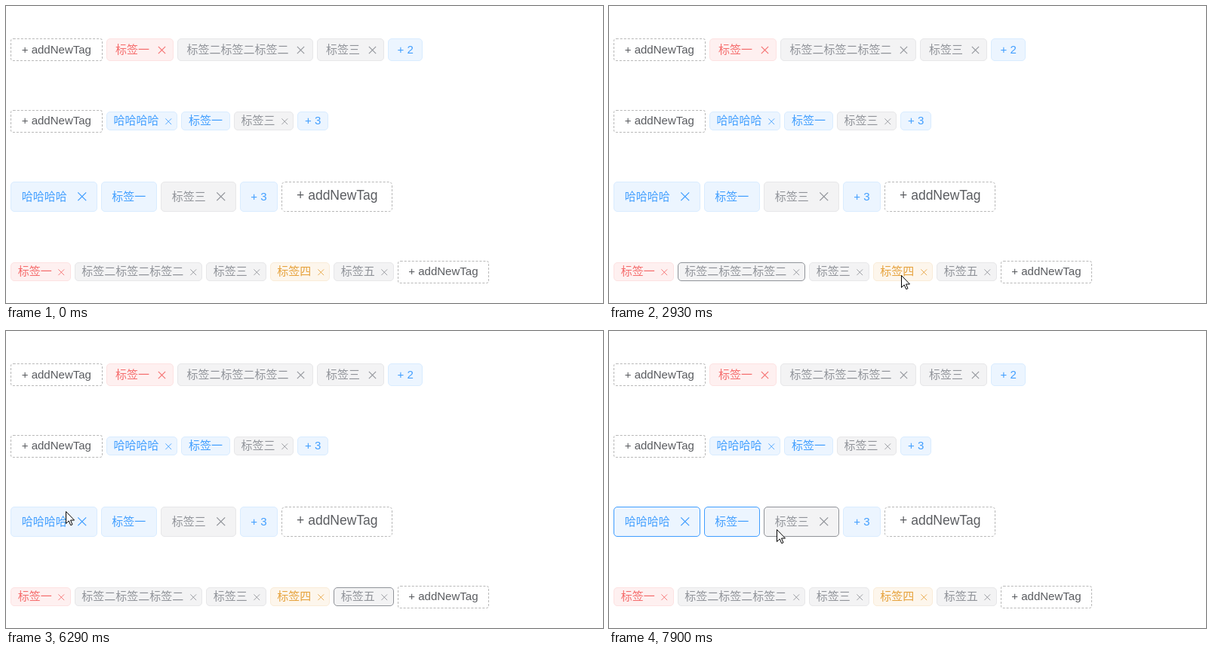
Write an HTML page that moves like this. It is 791 px wide and 394 px high and loops after 8 s.

```html
<!DOCTYPE html>
<html lang="zh-CN">
<head>
<meta charset="utf-8">
<title>Tag selection</title>
<style>
  html, body { margin: 0; width: 100%; height: 100%; overflow: hidden; background: #fff; }
  #stage { position: relative; width: 791px; height: 394px; overflow: hidden; }
  #rows {
    zoom: 1.25;
    font: 12px/1 "Liberation Sans", "Noto Sans CJK SC", "Noto Sans CJK JP", "Noto Sans CJK", sans-serif;
  }
  .row {
    position: absolute; left: 4.8px; height: 0; white-space: pre;
    display: flex; align-items: center; gap: 4px;
    --tag: 24px; --pad: 9px; --icon: 14px; --space: 6px;
  }
  .small { --tag: 20px; --pad: 7px; --icon: 12px; --space: 4px; }
  .large { --tag: 32px; --pad: 11px; --icon: 16px; --space: 8px; }
  .tag, .add {
    display: flex; align-items: center; flex: none; box-sizing: border-box;
    height: var(--tag); padding: 0 var(--pad); border: 1px solid; border-radius: 4px;
  }
  .tag span, .add span { position: relative; top: -.8px; }
  .add { height: 24px; padding: 0 11px; border: 1px dashed #b8b8b8; border-radius: 3px; color: #5a5c60; }
  .large .add { height: 32px; padding: 0 15px; border-radius: 4px; font-size: 14px; }
  .red { color: #f56c6c; background: #fef0f0; border-color: #fde2e2; }
  .gray { color: #909399; background: #f3f3f4; border-color: #e7e7e9; }
  .blue { color: #409eff; background: #ecf5ff; border-color: #d9ecff; }
  .gold { color: #e6a23c; background: #fdf6ec; border-color: #faecd8; }
  .tag.on { border-color: currentColor; }
  .tag svg {
    width: calc(var(--icon) - 2px); height: calc(var(--icon) - 2px);
    margin: 1px -3px 1px calc(var(--space) + 1px);
    stroke: currentColor; stroke-width: .7;
  }
  #lasso, #cursor { position: absolute; left: 0; top: 0; }
  #lasso { box-sizing: border-box; border: 1px solid #1f88e5; background: rgba(46, 115, 252, .08); }
</style>
</head>
<body>
<div id="stage">
  <div id="rows"></div>
  <div id="lasso"></div>
  <svg id="cursor" width="12" height="19">
    <path d="M.5 .5v16l3.7-3.6 2.5 5.8 2.3-1-2.5-5.7h5z" fill="#fff" stroke="#000"/>
  </svg>
</div>
<script>
const LOOP = 8000, STEP = 52, LAG = 35;
const lasso = document.getElementById('lasso');
const cursor = document.getElementById('cursor');

// Items are "color label", a trailing × makes the tag closable, "add" is the button.
const rows = [
  { y: 58, size: '', items: ['add', 'red 标签一×', 'gray 标签二标签二标签二×', 'gray 标签三×', 'blue + 2'] },
  { y: 152.8, size: 'small', items: ['add', 'blue 哈哈哈哈×', 'blue 标签一', 'gray 标签三×', 'blue + 3'] },
  { y: 253, size: 'large', items: ['blue 哈哈哈哈×', 'blue 标签一', 'gray 标签三×', 'blue + 3', 'add'] },
  { y: 352.8, size: 'small', items: ['red 标签一×', 'gray 标签二标签二标签二×', 'gray 标签三×', 'gold 标签四×', 'gray 标签五×', 'add'] },
];
const CLOSE = '<svg viewBox="0 0 10 10"><path d="M1.9 1.9 8.1 8.1M8.1 1.9 1.9 8.1"/></svg>';

function itemHtml(item) {
  if (item === 'add') return '<div class="add"><span>+ addNewTag</span></div>';
  const [, color, label, close] = item.match(/^(\w+) (.+?)(×?)$/);
  return `<div class="tag ${color}"><span>${label}</span>${close && CLOSE}</div>`;
}

document.getElementById('rows').innerHTML = rows.map(({ y, size, items }) =>
  `<div class="row ${size}" style="top:${y / 1.25}px">${items.map(itemHtml).join('')}</div>`).join('');
const [, , thirdRow, lastRow] = [...document.querySelectorAll('.row')]
  .map(row => [...row.querySelectorAll('.tag')]);
const tags = document.querySelectorAll('.tag');

// Two drags select tags; in between, the left arrow key walks through the last row.
const selections = [
  { at: 0, on: [] },
  { at: 1650, on: lastRow.slice(1, 4) },
  { at: 2930, on: [lastRow[1]] },
  { at: 3510, on: [lastRow[0]] },
  { at: 3690, on: [lastRow[4]] },
  { at: 7430, on: thirdRow.slice(0, 3) },
];

const linear = u => u;
const easeIn = u => u ** 1.5;
const easeOut = u => 1 - (1 - u) ** 2;
const easeInOut = u => u < .5 ? 4 * u ** 3 : 1 - 4 * (1 - u) ** 3;

const entry = [207, 387];
const glides = [
  { at: 210, end: 640, to: [221, 346], ease: easeOut },
  { at: 750, end: 1050, to: [324, 357], ease: linear },
  { at: 1050, end: 1390, to: [387, 357], ease: easeOut },
  { at: 5790, end: 6190, to: [62, 214], ease: easeInOut },
  { at: 6190, end: 6440, to: [89, 253], ease: easeOut },
  { at: 6640, end: 6870, to: [184, 261], ease: easeIn },
  { at: 6870, end: 7260, to: [222, 267], ease: easeOut },
  { at: 7600, end: 7900, to: [222, 263], ease: easeIn },
];
const drags = [{ at: 750, end: 1650 }, { at: 6640, end: 7430 }];

const lastBefore = (list, t) => list.findLast(item => item.at <= t);

// The pointer is seen only at regular ticks of each glide.
function snap(t) {
  const { at, end } = lastBefore(glides, t);
  const tick = (end - at) / Math.round((end - at) / STEP);
  return Math.min(end, at + Math.floor((t - at) / tick + 1e-6) * tick);
}

function pointerAt(t) {
  const i = glides.indexOf(lastBefore(glides, t));
  const { at, end, to, ease } = glides[i];
  const from = i ? glides[i - 1].to : entry;
  const p = ease(Math.min(1, (t - at) / (end - at)));
  return from.map((v, axis) => Math.round(v + (to[axis] - v) * p));
}

function drawPointer(t) {
  const visible = t >= glides[0].at;
  cursor.style.display = visible ? '' : 'none';
  lasso.style.display = 'none';
  if (!visible) return;

  const seen = snap(t);
  const [x, y] = pointerAt(seen);
  cursor.style.transform = `translate(${x}px,${y}px)`;

  const drag = drags.find(d => t >= d.at && t < d.end);
  if (!drag) return;
  const [left, top] = pointerAt(drag.at);
  const settled = t - seen > 2 * STEP;
  const width = (settled ? x : pointerAt(seen - LAG)[0]) - left;
  if (width < 2) return;
  Object.assign(lasso.style, {
    display: '', left: left + 'px', top: top + 'px', width: width + 'px', height: y - top + 'px',
  });
}

function draw(t) {
  const { on } = lastBefore(selections, t);
  tags.forEach(tag => tag.classList.toggle('on', on.includes(tag)));
  drawPointer(t);
}

const start = performance.now();
function frame() {
  draw((performance.now() - start) % LOOP);
  requestAnimationFrame(frame);
}
frame();
</script>
</body>
</html>
```
